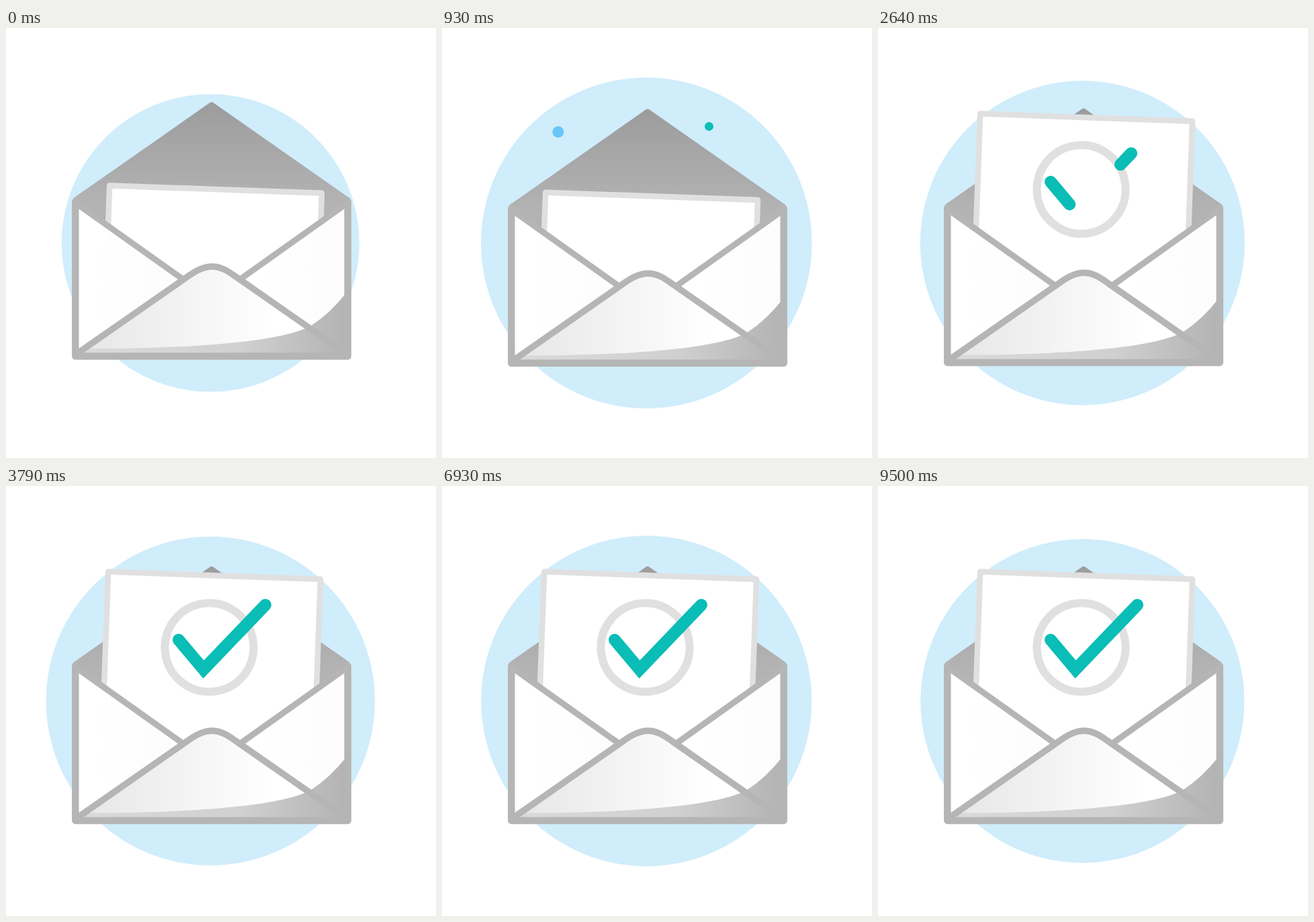
An HTML page for the animation above (9570 ms loop, 640 px wide and 640 px high).

```html
<!DOCTYPE html>
<html lang="en">
<head>
<meta charset="utf-8">
<title>Envelope</title>
<style>
html, body { margin: 0; height: 100%; overflow: hidden; background: #fff; }
svg { display: block; width: 100%; height: 100%; }
</style>
</head>
<body>
<svg viewBox="0 0 640 640" fill="none" stroke-linejoin="round" stroke-linecap="round">
  <defs>
    <linearGradient id="back" gradientUnits="userSpaceOnUse" x1="0" y1="120" x2="0" y2="270">
      <stop stop-color="#9c9c9c"/><stop offset="1" stop-color="#b3b3b3"/>
    </linearGradient>
    <linearGradient id="side"><stop offset=".2" stop-color="#fff"/><stop offset="1" stop-color="#fcfcfc"/></linearGradient>
    <linearGradient id="front" gradientUnits="userSpaceOnUse" x1="110" y1="0" x2="400" y2="0">
      <stop stop-color="#e6e6e6"/><stop offset="1" stop-color="#fff"/>
    </linearGradient>
    <linearGradient id="shade" gradientUnits="userSpaceOnUse" x1="118" y1="0" x2="506" y2="0">
      <stop stop-color="#dadada"/><stop offset=".6" stop-color="#d0d0d0"/><stop offset="1" stop-color="#b3b3b3"/>
    </linearGradient>
    <clipPath id="inside"><path d="M0 0H640V485H0Z"/></clipPath>
  </defs>

  <circle id="disc" cx="304.3" cy="320" fill="#d0edfb"/>
  <g id="dots"></g>

  <g id="envelope">
    <path d="M306 123L103 265L306 410L509 265Z" fill="url(#back)" stroke="url(#back)" stroke-width="7"/>
    <g clip-path="url(#inside)">
      <g id="letter">
        <path d="M141.5 420L152.2 127.5L468 138.8L457.5 430" fill="#fff" stroke="#e0e0e0" stroke-width="8.5"/>
        <circle id="ring" cx="302.5" cy="240.3" r="66" stroke="#e0e0e0" stroke-width="12" pathLength="360"
          stroke-linecap="round"/>
        <path id="check" d="M257 229L294 273L386 177" stroke="#0abdb6" stroke-width="18" stroke-linejoin="miter"/>
      </g>
    </g>
    <path d="M103 269.5L263 383L103 494Z" fill="url(#side)"/>
    <path d="M509 269.5L349 383L509 494Z" fill="url(#side)"/>
    <path d="M103.3 269.5L263 383M508.7 269.5L349 383" stroke="#b5b5b5" stroke-width="9"/>
    <path id="flap" d="M105 494.5L270 379.5C283 370 294 364.3 306.500 364.3S329 370 342 379.5L507 494.5" fill="url(#front)"/>
    <path d="M116 486.500C240 487 410 480 456 451Q482 434 506 404V496H108Z" fill="url(#shade)"/>
    <use href="#flap" id="edge"/>
    <path d="M105 494.5L270 379.5C283 370 294 364.3 306.5 364.3S329 370 342 379.5L507 494.5" stroke="#b5b5b5" stroke-width="9.5"/>
    <path d="M103.300 268V497.900H508.700V268" stroke="#b5b5b5" stroke-width="10.5"/>
  </g>
</svg>
<script>
const LOOP = 9570;
const $ = id => document.getElementById(id);
const clamp = x => Math.min(1, Math.max(0, x));
const span = (t, from, to) => clamp((t - from) / (to - from));
const sine = p => (1 - Math.cos(Math.PI * p)) / 2;
const cubicOut = p => 1 - (1 - p) ** 3;
const cubicInOut = p => p < .5 ? 4 * p ** 3 : 1 - 4 * (1 - p) ** 3;

// Eased value through [time, value] keys
function track(keys, t) {
  let value = keys[0][1];
  for (let i = 1; i < keys.length; i++)
    value += (keys[i][1] - keys[i - 1][1]) * sine(span(t, keys[i - 1][0], keys[i][0]));
  return value;
}

const discKeys = [[0, 221.5], [900, 246.3], [2950, 241.2], [5000, 251], [7100, 246], [9350, 241]];
const dropKeys = [[0, -9.3], [850, 1], [1400, 0]];

// Reach of each dot from the burst centre, radius, colour, shrink times
const burst = [283, 247];
const dots = [
  [-229, -192, 8.5, "#66c6f9", 2080, 2450],
  [238, -209, 6.5, "#0abdb6", 2080, 2450],
  [342, -96, 21.5, "#d0edfb", 1720, 2010],
  [327, 278, 4.3, "#66c6f9", 2080, 2400],
  [-4, 346, 10.7, "#0abdb6", 1780, 2120]
].map(([dx, dy, r, fill, from, to]) => {
  const el = document.createElementNS("http://www.w3.org/2000/svg", "circle");
  el.setAttribute("fill", fill);
  $("dots").append(el);
  return { dx, dy, r, from, to, el };
});

function set(el, attrs) {
  for (const k in attrs) el.setAttribute(k, attrs[k]);
}

$("edge").remove();
const check = $("check"), shortArm = Math.hypot(37, 44), longArm = Math.hypot(92, 96);

function drawCheck(t) {
  const first = span(t, 2400, 2717), second = span(t, 2500, 2900);
  const start = .83 * (1 - second ** 2), end = .83 + .17 * clamp(second * 1.2);
  check.style.display = first ? "" : "none";
  if (second === 1) return set(check, { "stroke-dasharray": "none" });
  const a = shortArm * first, b = shortArm + longArm * start;
  const dash = [a, b - a];
  if (second) dash.push(longArm * (end - start));
  dash.push(second ? 400 : 0, 0, 400);
  set(check, { "stroke-dasharray": second ? dash.slice(0, 4).join(" ") : `${a} 400` });
}

function drawRing(t) {
  const p = sine(span(t, 1180, 2180)), arc = 360 * p;
  $("ring").style.display = p ? "" : "none";
  set($("ring"), {
    "stroke-dasharray": p < 1 ? `${arc} ${360 - arc}` : "none",
    transform: `rotate(${174.5 - arc / 2} 302.5 240.3)`
  });
}

function draw(t) {
  set($("disc"), { r: track(discKeys, t) });
  set($("envelope"), { transform: `translate(0 ${track(dropKeys, t)})` });
  const low = 1 - cubicInOut(span(t, 1000, 1505));
  set($("letter"), { transform: `translate(${2 * low} ${116.3 * low})` });
  const reach = cubicOut(span(t, 506, 2671));
  for (const d of dots) set(d.el, {
    cx: burst[0] + d.dx * reach,
    cy: burst[1] + d.dy * reach,
    r: t < 506 ? 0 : d.r * (1 - span(t, d.from, d.to))
  });
  drawRing(t);
  drawCheck(t);
}

const begin = performance.now();
function tick() {
  draw((performance.now() - begin) % LOOP);
  requestAnimationFrame(tick);
}
tick();
</script>
</body>
</html>
```
